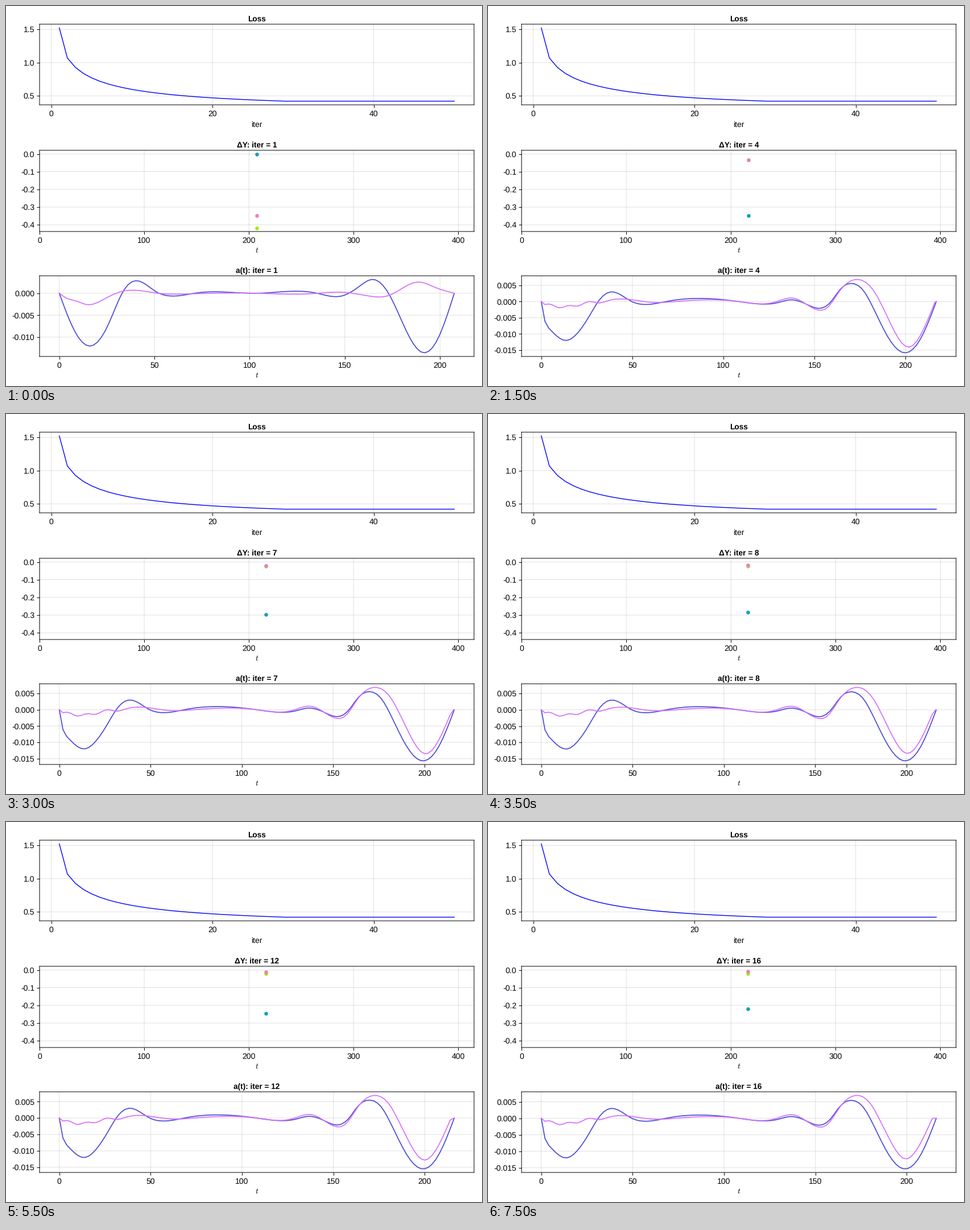
Write a matplotlib script that moves like this. It is 837 px wide and 669 px high and loops after 8 s.

```python
import numpy as np
import matplotlib.pyplot as plt
from matplotlib.animation import FuncAnimation
from matplotlib.ticker import FixedLocator, FormatStrFormatter

W, H, DPI = 837, 669, 96
PX = 72 / DPI  # one pixel in points
LEFT, RIGHT = 59, 823
FRAMES, INTERVAL = 16, 500

plt.rcParams.update({
    "font.family": "Liberation Sans",
    "font.size": 14 * PX,
    "mathtext.fontset": "cm",
    "axes.unicode_minus": False,
    "text.hinting": "none",
    "path.snap": False,
})


def spline(*knots):
    """Natural cubic spline through (position, value) knots."""
    x, y = np.array(knots).T
    n = len(x)
    poly = np.column_stack([np.ones(n), x])
    system = np.block([[np.abs(x[:, None] - x) ** 3, poly],
                       [poly.T, np.zeros((2, 2))]])
    w = np.linalg.solve(system, np.append(y, [0, 0]))
    return lambda s: np.abs(s[:, None] - x) ** 3 @ w[:n] + w[n] + w[n + 1] * s


# Lobes of each signal: share of the time span, value in thousandths
blue_first = spline(
    (0, 0), (.03, -7), (.0775, -12.05), (.1235, -7.25), (.162, .5), (.198, 2.85),
    (.246, .3), (.278, -.6), (.35, .1), (.5, 0), (.65, .05), (.714, -.65),
    (.76, 1.6), (.792, 3.16), (.836, -.4), (.887, -10.1), (.92, -13.54),
    (.96, -10.1), (1, 0))
pink_first = spline(
    (0, 0), (.02, -1.2), (.044, -1.8), (.07, -2.6), (.109, -1.55), (.148, .13),
    (.174, .65), (.217, .45), (.25, 0), (.325, -.15), (.5, 0), (.64, -.1),
    (.717, .23), (.786, -.65), (.829, -.65), (.855, .4), (.887, 2.07),
    (.912, 2.55), (.951, 1.36), (1, 0))
blue_next = spline(
    (0, 0), (.009, -6), (.018, -8.1), (.063, -12.03), (.092, -9.7), (.121, -4.6),
    (.147, .5), (.178, 3), (.229, 0), (.257, -.87), (.325, .2), (.5, 0),
    (.6, -.3), (.63, .53), (.67, -.75), (.703, -2.12), (.733, -.1), (.76, 4.25),
    (.786, 5.66), (.816, 3.36), (.836, -.9), (.877, -10.97), (.92, -16.02),
    (.963, -11), (1, 0))
pink_next = spline(
    (0, 0), (.009, -.9), (.018, -.75), (.045, -1.95), (.07, -1.2), (.09, -1.45),
    (.12, 0), (.145, -.45), (.167, .2), (.203, .8), (.28, -.25), (.35, .1),
    (.5, 0), (.589, -.25), (.638, 1.06), (.66, 0), (.705, -2.7), (.726, -1.7),
    (.755, 3.2), (.8, 6.8), (.848, 2.3), (.898, -10.1), (.933, -14.78),
    (.973, -8.3), (1, 0))


def end_time(it):
    return 207.5 if it == 1 else 216.1 + 1.3 * np.exp((2 - it) / 3.5)


def deltas(it):
    """Green, teal and pink error."""
    if it == 1:
        return -.417, 0, -.347
    return (-.022 - .033 * np.exp((2 - it) / 2),
            -.413 + .0935 * np.log(it / 2),
            -.138 / it)


def signals(it):
    end = end_time(it)
    t = np.append(np.arange(0, end, 2), end)
    s = t / end
    if it == 1:
        return t, blue_first(s) / 1000, pink_first(s) / 1000
    # The right lobes shrink, and the pink one ends earlier
    k = ((it - 2) / 14) ** 0.65
    a = blue_next(s) * np.where(s > .75, 1 - .04 * k, 1)
    b = pink_next(np.minimum(s + .01 * k * np.clip((s - .8) / .13, 0, 1), 1))
    b *= np.where(s < .75, 1, np.where(b < 0, 1 - .165 * k, 1 + .02 * k))
    return t, a / 1000, b / 1000


def padded(lo, hi):
    pad = 0.05 * (hi - lo)
    return lo - pad, hi + pad


fig = plt.figure(figsize=(W / DPI, H / DPI), dpi=DPI, facecolor="white")


def panel(top, bottom, xticks, yticks, fmt):
    ax = fig.add_axes([LEFT / W, 1 - bottom / H, (RIGHT - LEFT) / W, (bottom - top) / H])
    ax.xaxis.set_major_locator(FixedLocator(xticks))
    ax.yaxis.set_major_locator(FixedLocator(yticks))
    ax.xaxis.set_major_formatter(FormatStrFormatter("%d"))
    ax.yaxis.set_major_formatter(FormatStrFormatter(fmt))
    ax.tick_params(length=5 * PX, width=PX)
    ax.tick_params(axis="x", pad=5 * PX)
    ax.tick_params(axis="y", pad=4 * PX)
    ax.set_axisbelow(True)
    ax.grid(color="black", alpha=0.12, lw=PX)
    for spine in ax.spines.values():
        spine.set_linewidth(PX)
    return ax


def title(ax, text):
    ax.set_title(text, fontsize=13.6 * PX, fontweight="bold", pad=5 * PX)


def label(text, y):
    fig.text((LEFT + RIGHT) / 2 / W, 1 - y / H, text, ha="center", va="baseline")


loss_ax = panel(32, 174, [0, 20, 40], [0.5, 1.0, 1.5], "%.1f")
dot_ax = panel(254, 397, range(0, 500, 100), np.arange(-4, 1) / 10, "%.1f")
sig_ax = panel(475, 617, range(0, 250, 50), np.arange(-3, 2) * 0.005, "%.3f")

title(loss_ax, "Loss")
label("iter", 213)
label("$t$", 434)
label("$t$", 654)

# Loss falls with the log of the iteration and stays flat from 29 on
n = np.arange(1, 51)
left = np.log(29 / np.minimum(n, 29))
loss = .42 + left * (.116 + .0475 * left)
loss[0] = 1.523
loss_ax.plot(n, loss, color="blue", lw=1.4 * PX)
loss_ax.set_xlim(padded(1, 50))
loss_ax.set_ylim(padded(loss.min(), loss.max()))

dots = [dot_ax.plot([], [], "o", color=c, ms=6.6 * PX, mew=0)[0]
        for c in ("#9aee10", "#14a0b8", "#f07cc0")]
dot_ax.set_xlim(0, 415)
dot_ax.set_ylim(padded(-0.417, 0))

blue, = sig_ax.plot([], [], color="#4848d8", lw=1.7 * PX)
pink, = sig_ax.plot([], [], color="#d66eff", lw=1.7 * PX)


def update(i):
    it = i + 1
    t, a, b = signals(it)
    for dot, value in zip(dots, deltas(it)):
        dot.set_data([t[-1]], [value])
    blue.set_data(t, a)
    pink.set_data(t, b)
    sig_ax.set_xlim(padded(0, t[-1]))
    sig_ax.set_ylim(padded(min(a.min(), b.min()), max(a.max(), b.max())))
    title(dot_ax, f"ΔY: iter = {it}")
    title(sig_ax, f"a(t): iter = {it}")
    return [*dots, blue, pink]


anim = FuncAnimation(fig, update, frames=FRAMES, interval=INTERVAL,
                     repeat=True, repeat_delay=0, blit=False)
plt.show()
```
